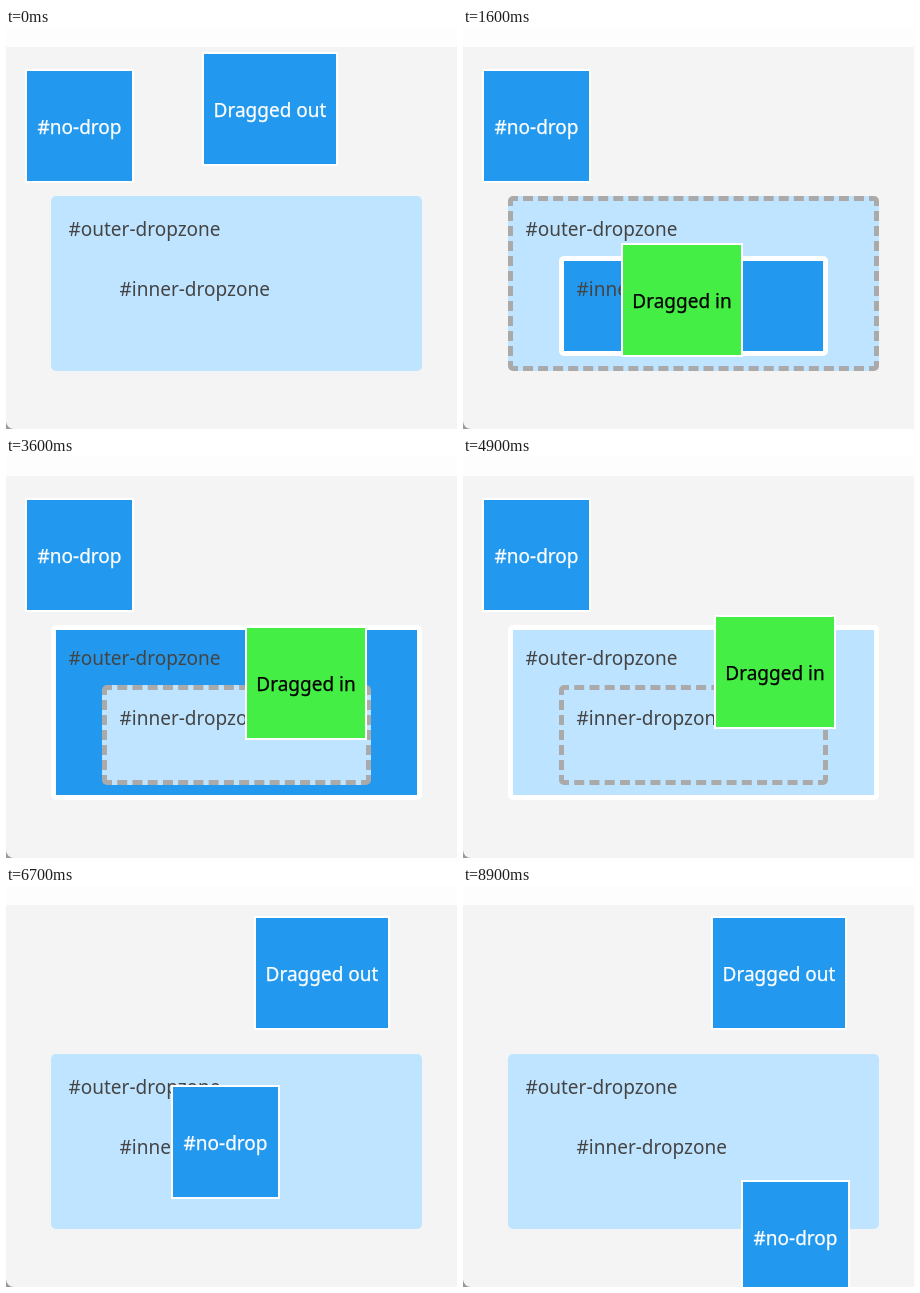
These frames come from a looping animation (451 px wide and 401 px high, 9600 ms). An HTML page:

```html
<!DOCTYPE html>
<html lang="en">
<head>
<meta charset="utf-8">
<title>Dropzones</title>
<style>
  html, body { margin: 0; width: 100%; height: 100%; overflow: hidden; background: #999; }
  #stage {
    position: absolute; inset: 0; overflow: hidden;
    background: linear-gradient(#fdfdfd 19px, #f4f4f4 19px);
    border-bottom-left-radius: 8px;
    font: 19px/30px "Noto Sans", "Open Sans", sans-serif;
    white-space: nowrap;
  }
  .zone, .block { position: absolute; left: 0; top: 0; box-sizing: border-box; }
  .zone { border: 5px solid transparent; border-radius: 5px; padding: 13px 12.5px; color: #444; }
  .block {
    height: 114px; padding-top: 41px; border: 2px solid #fff;
    background: #29e; color: #fff; text-align: center;
    -webkit-text-stroke: 0.25px;
  }
  #fixed { width: 109px; }
</style>
</head>
<body>
<div id="stage">
  <div class="zone" id="outer">#outer-dropzone</div>
  <div class="zone" id="inner">#inner-dropzone</div>
  <div class="block" id="fixed">#no-drop</div>
  <div class="block" id="drop">Dragged out</div>
</div>
<script>
const LOOP = 9600, STEP = 100, TICK = 10, FADE = 300, OVERLAP = 0.75;
const LIGHT = [191, 228, 255], BLUE = [34, 153, 238], GREEN = [68, 238, 68];
const BLOCK = { w: 122, h: 114 };
const WIDTHS = { 'Dragged out': 136, 'Dragged in': BLOCK.w, 'Dropped': 102 };

const byId = id => document.getElementById(id);
const fixed = byId('fixed'), drop = byId('drop');

function makeZone(id, x, y, w, h) {
  const el = byId(id);
  Object.assign(el.style, { left: x + 'px', top: y + 'px', width: w + 'px', height: h + 'px' });
  return { el, x, y, w, h, hits: [] };
}
const outer = makeZone('outer', 45, 168, 371, 175);
const inner = makeZone('inner', 96, 228, 269, 100);

// Moves: begin, end, x, y reached
const dropPath = {
  from: [196, 24],
  moves: [
    [650, 1400, 158, 215], [3140, 3540, 239, 169], [3750, 3900, 244, 152],
    [4800, 4900, 251, 158], [4900, 5200, 307, 166], [5492, 5644, 248, 30]
  ]
};
const fixedPath = {
  from: [19, 41],
  moves: [
    [6250, 6700, 165, 199], [7250, 7600, 179, 303],
    [7750, 8000, 158, 296], [8000, 8400, 254, 298], [8550, 8900, 278, 294]
  ]
};
// Times between grabbing and releasing the green block
const holds = [[690, 2110], [3150, 4200], [4890, 5900]];

const clamp = u => Math.min(1, Math.max(0, u));
const mix = (a, b, k) => `rgb(${a.map((v, i) => Math.round(v + (b[i] - v) * k))})`;
const isHeld = t => holds.some(([a, b]) => t >= a && t < b);

function pointAt(path, t) {
  let [x, y] = path.from;
  for (const [begin, end, toX, toY] of path.moves) {
    const u = clamp((t - begin) / (end - begin)), s = u * u * (3 - 2 * u);
    x += (toX - x) * s;
    y += (toY - y) * s;
  }
  return [x, y];
}

// Share of the block that lies in a zone
function cover(zone, x, y) {
  const span = (a, size, b, room) =>
    Math.max(0, Math.min(a + size, b + room) - Math.max(a, b)) / size;
  return span(x, BLOCK.w, zone.x, zone.w) * span(y, BLOCK.h, zone.y, zone.h);
}

function valueAt(list, t, start) {
  let value = start;
  for (const [time, next] of list) if (t >= time) value = next;
  return value;
}

function note(list, t, value, start) {
  if (valueAt(list, t, start) !== value) list.push([t, value]);
}

// Run the drags once and note each change of state
const labels = [], canDrop = [];
for (let t = 0; t < LOOP; t += TICK) {
  const [x, y] = pointAt(dropPath, t), held = isHeld(t);
  const inInner = cover(inner, x, y) >= OVERLAP;
  const inOuter = cover(outer, x, y) >= OVERLAP;
  const inside = inInner || inOuter;
  note(inner.hits, t, +(held && inInner), 0);
  note(outer.hits, t, +(held && inOuter && !inInner), 0);
  note(canDrop, t, +inside, 0);
  note(labels, t, !inside ? 'Dragged out' : held ? 'Dragged in' : 'Dropped');
}

// The CSS "ease" curve
function ease(u) {
  const bez = (a, b, s) => 3 * a * s * (1 - s) ** 2 + 3 * b * s * s * (1 - s) + s ** 3;
  let lo = 0, hi = 1;
  for (let i = 0; i < 20; i++) {
    const mid = (lo + hi) / 2;
    if (bez(0.25, 0.25, mid) < u) lo = mid; else hi = mid;
  }
  return bez(0.1, 1, lo);
}

function fadeAt(list, t) {
  let from = 0, to = 0, since = -FADE;
  const level = now => from + (to - from) * ease(clamp((now - since) / FADE));
  for (const [time, next] of list) {
    if (t < time) break;
    from = level(time);
    to = next;
    since = time;
  }
  return level(t);
}

function place(el, path, t) {
  const [x, y] = pointAt(path, t).map(Math.round);
  el.style.transform = `translate(${x}px, ${y}px)`;
}

function paintZone({ el, hits }, t) {
  const hit = valueAt(hits, t, 0);
  el.style.backgroundColor = mix(LIGHT, BLUE, fadeAt(hits, t));
  el.style.borderStyle = hit ? 'solid' : 'dashed';
  el.style.borderColor = hit ? '#fff' : isHeld(t) ? '#aaa' : 'transparent';
}

function draw(t) {
  paintZone(outer, t);
  paintZone(inner, t);
  place(fixed, fixedPath, t);
  place(drop, dropPath, t);
  const label = valueAt(labels, t);
  if (drop.textContent !== label) drop.textContent = label;
  drop.style.width = WIDTHS[label] + 'px';
  drop.style.color = valueAt(canDrop, t, 0) ? '#000' : '#fff';
  drop.style.backgroundColor = mix(BLUE, GREEN, fadeAt(canDrop, t));
}

const start = performance.now();
function tick() {
  const t = (performance.now() - start) % LOOP;
  draw(Math.floor(t / STEP) * STEP);
  requestAnimationFrame(tick);
}
tick();
</script>
</body>
</html>
```
